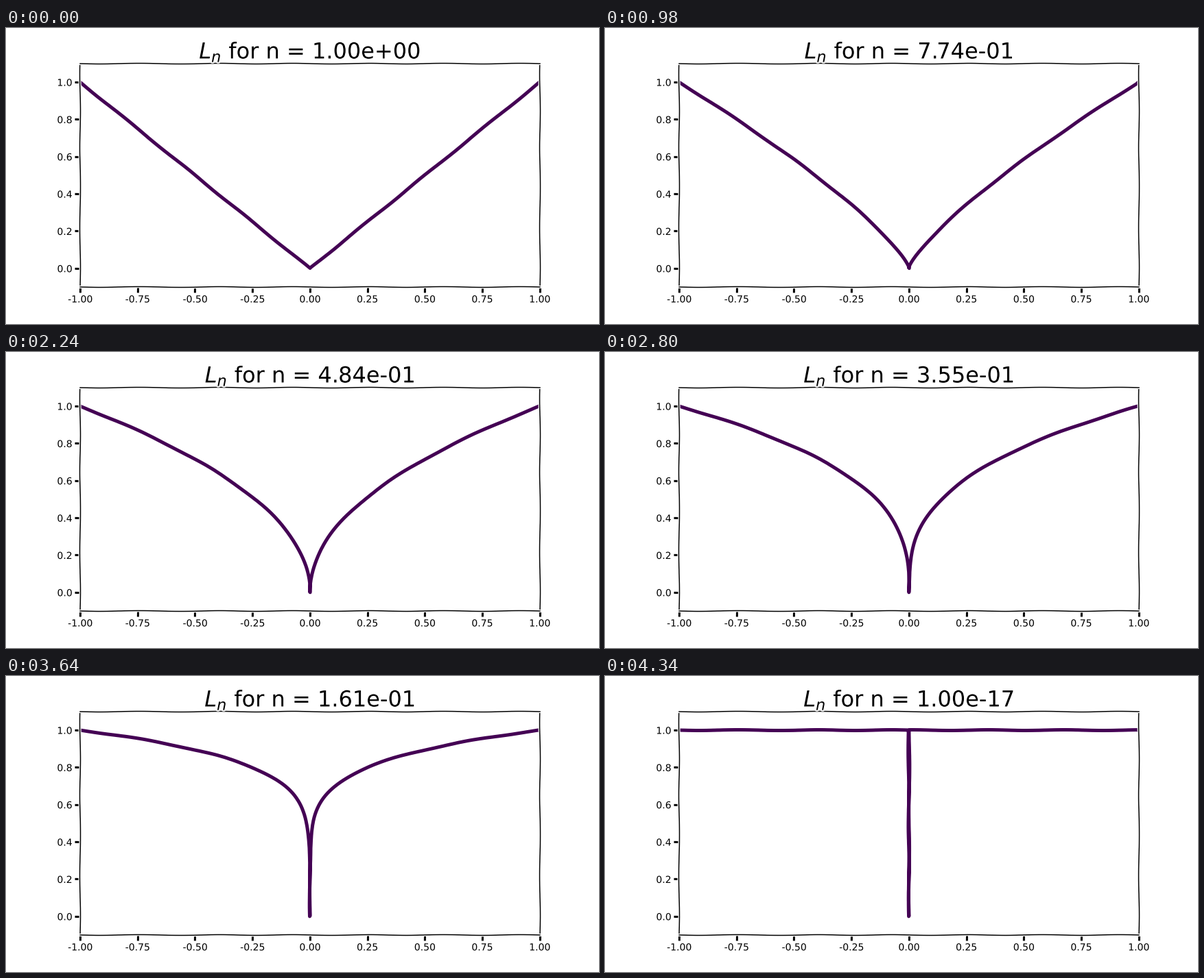
These frames come from a looping animation (864 px wide and 432 px high, 4.48 s). A matplotlib script:

```python
import numpy as np
import matplotlib.pyplot as plt
from matplotlib.animation import FuncAnimation

FRAMES, STEP_MS = 32, 140

plt.xkcd(scale=0.5, length=125, randomness=2)
plt.rcParams.update({
    "font.family": "DejaVu Sans",
    "mathtext.fontset": "dejavusans",
    "axes.unicode_minus": False,
})

fig, ax = plt.subplots(figsize=(12, 6), dpi=72)
fig.subplots_adjust(left=0.125, right=0.9, bottom=0.125, top=0.88)
ax.set(xlim=(-1, 1), ylim=(-0.1, 1.1),
       xticks=np.linspace(-1, 1, 9), yticks=np.linspace(0, 1, 6))
ax.xaxis.set_major_formatter("{x:.2f}")
ax.yaxis.set_major_formatter("{x:.1f}")

x = np.linspace(-1, 1, 1001)
powers = np.linspace(1, 1e-17, FRAMES)
curve, = ax.plot(x, np.abs(x), lw=5, color="#440154")
title = ax.set_title("", fontsize=32)


def draw(i):
    n = powers[i]
    curve.set_ydata(np.abs(x) ** n)
    title.set_text(f"$L_n$ for n = {n:.2e}")
    return curve, title


anim = FuncAnimation(fig, draw, frames=FRAMES, interval=STEP_MS,
                     repeat=True, repeat_delay=0)
plt.show()
```
